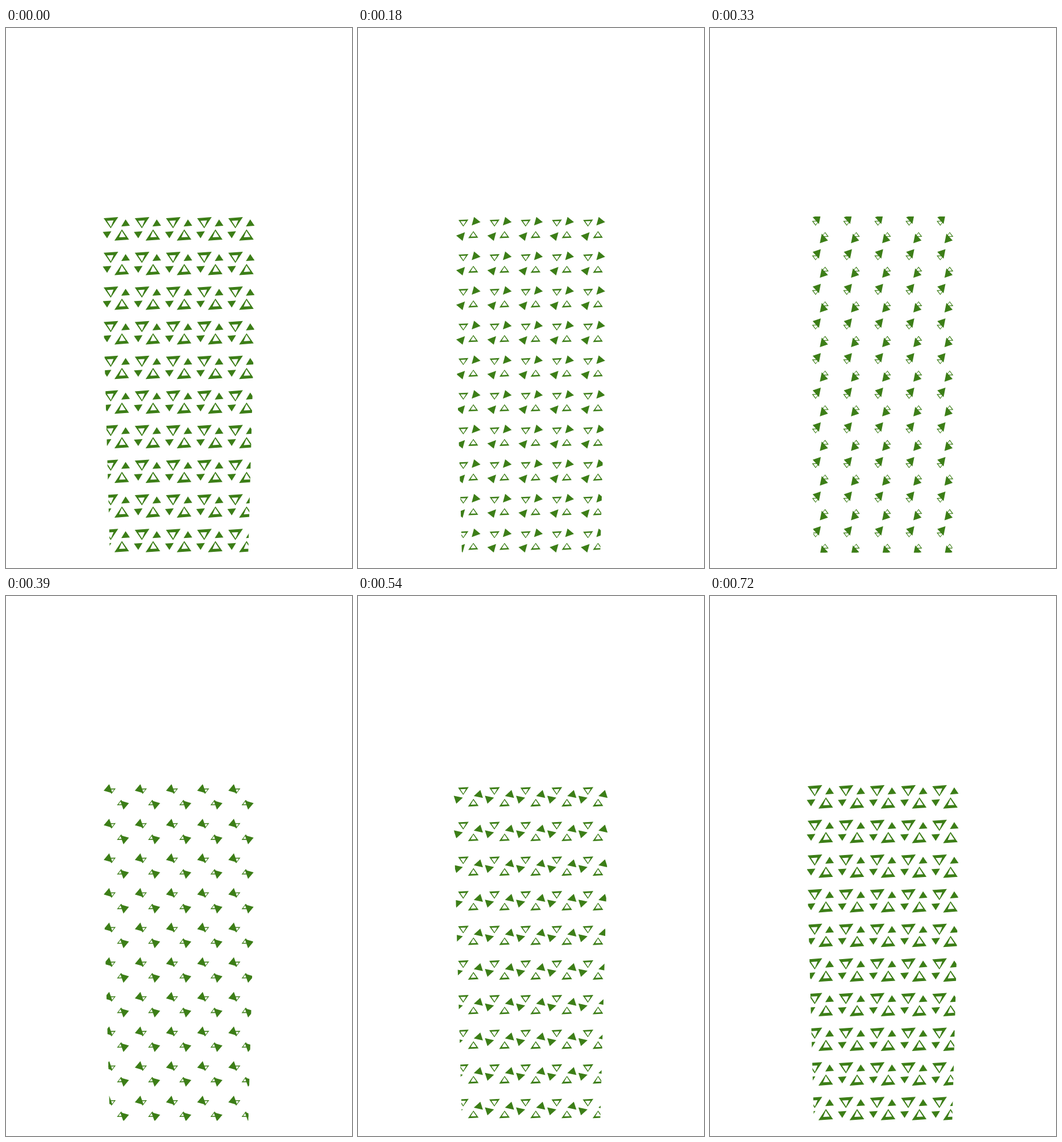
Recreate the animation shown at these times as an HTML page with a canvas. Size 599 by 934 pixels, loop 0.75 s.

```html
<!DOCTYPE html>
<html lang="en">
<head>
<meta charset="utf-8">
<title>Turning triangles</title>
<style>
  html, body { margin: 0; width: 100%; height: 100%; overflow: hidden; background: #fff; }
  canvas { display: block; }
</style>
</head>
<body>
<canvas id="stage" width="599" height="934"></canvas>
<script>
const ctx = document.getElementById('stage').getContext('2d');
const STEP = 30, STEPS = 25;
const COLS = 5, ROWS = 10, PITCH_X = 53.95, PITCH_Y = 59.9;
const ORIGIN = [191, 347.4];
const PEAK = 0.42; // moment when the outlined triangles are smallest

// Triangles relative to the centre of a cell
const SOLID = [[8.6, -4.2], [23.5, -5.3], [16, -16.3]];
const SOLID_CENTRE = [16, -8.6];
const OUTER = { big: [[-22, -18.5], [3.3, -20.3], [-9.7, -0.8]], small: [[-14.3, -13.6], [-1.6, -13.9], [-8.2, -5.6]] };
const HOLE = { big: [[-16.2, -14], [-4.8, -14.6], [-9.4, -3.5]], small: [[-12, -12.5], [-3.6, -12.8], [-8, -7.2]] };

const mix = ({ big, small }, k) =>
  big.map((p, i) => p.map((v, j) => v + (small[i][j] - v) * k));

const grow = (points, centre, k) =>
  points.map(p => p.map((v, j) => centre[j] + (v - centre[j]) * k));

const rotate = (points, a) => {
  const c = Math.cos(a), s = Math.sin(a);
  return points.map(([x, y]) => [x * c + y * s, y * c - x * s]);
};

const ease = (s, power) => s ** power / (s ** power + (1 - s) ** power);
const smooth = u => u * u * (3 - 2 * u);
const shrinkAt = s => s < PEAK ? smooth(s / PEAK) : 1 - ((s - PEAK) / (1 - PEAK)) ** 1.4;

function trace(path, points, dx = 0) {
  points.forEach(([x, y], i) => i ? path.lineTo(x + dx, y) : path.moveTo(x + dx, y));
  path.closePath();
}

const frustum = new Path2D();
trace(frustum, [[164, 326], [435, 326], [419.4, 907.5], [179.8, 907.5]]);

function draw(time) {
  const s = Math.floor(time / STEP) % STEPS / (STEPS - 1);
  const shrink = shrinkAt(s), swell = Math.sin(Math.PI * s);

  const solid = new Path2D(), outline = new Path2D();
  const swollen = grow(SOLID, SOLID_CENTRE, 1 + 0.12 * swell);
  trace(solid, rotate(swollen, Math.PI * ease(s, 2.1)), -swell);
  trace(outline, mix(OUTER, shrink));
  trace(outline, mix(HOLE, shrink));

  ctx.fillStyle = '#fff';
  ctx.fillRect(0, 0, 599, 934);
  ctx.save();
  ctx.clip(frustum);
  ctx.fillStyle = '#3c7e17';
  for (let row = 0; row < ROWS; row++) {
    for (let col = 0; col < COLS; col++) {
      ctx.save();
      ctx.translate(ORIGIN[0] + col * PITCH_X, ORIGIN[1] + row * PITCH_Y);
      for (let half = 0; half < 2; half++) {
        ctx.fill(outline, 'evenodd');
        ctx.fill(solid);
        ctx.scale(-1, -1);
      }
      ctx.restore();
    }
  }
  ctx.restore();
}

const start = performance.now();
function tick() {
  draw(performance.now() - start);
  requestAnimationFrame(tick);
}
tick();
</script>
</body>
</html>
```
